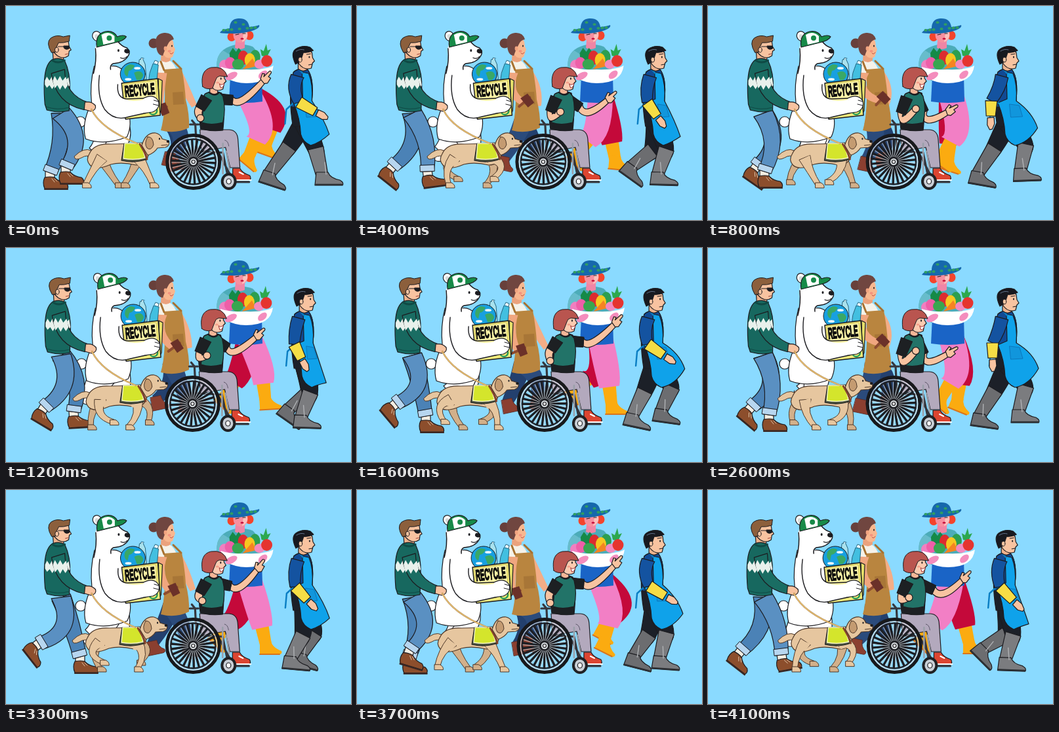
Write an HTML page with a canvas that moves like this. It is 526 px wide and 327 px high and loops after 4200 ms.

```html
<!DOCTYPE html>
<html lang="en">
<head>
<meta charset="utf-8">
<title>Walking parade</title>
<style>
html, body { margin: 0; width: 100%; height: 100%; overflow: hidden; background: #8adaff; }
canvas { display: block; }
</style>
</head>
<body>
<canvas id="stage" width="526" height="327"></canvas>
<script>
const ctx = document.getElementById('stage').getContext('2d');
const INK = '#1c1c20', SKIN = '#f8c3a0';
const STEP = 100, FRAMES = 42, CYCLE = 19;
const KEYS = [0, 3, 7, 8, 11, 14, 16];
ctx.lineJoin = ctx.lineCap = 'round';

function paint(path, fill, line, lw) {
  if (fill) { ctx.fillStyle = fill; ctx.fill(path); }
  if (line) { ctx.strokeStyle = line; ctx.lineWidth = lw; ctx.stroke(path); }
}
const shape = (d, fill, line = INK, lw = 1.2) => paint(new Path2D(d), fill, line, lw);

function oval(x, y, rx, ry, fill, line, lw = 1.2, turn = 0) {
  const p = new Path2D();
  p.ellipse(x, y, rx, ry, turn, 0, 7);
  paint(p, fill, line, lw);
}

function at(x, y, deg, draw) {
  ctx.save();
  ctx.translate(x, y);
  ctx.rotate(deg * Math.PI / 180);
  draw();
  ctx.restore();
}

// Interpolate a pose given at the KEYS of the walk cycle.
function pose(k, rows) {
  let i = KEYS.length - 1;
  while (KEYS[i] > k) i--;
  const j = (i + 1) % KEYS.length;
  const f = (k - KEYS[i]) / ((j ? KEYS[j] : CYCLE) - KEYS[i]);
  return rows[i].map((v, c) => v + (rows[j][c] - v) * f);
}

const mix = (a, b, f) => [a[0] + (b[0] - a[0]) * f, a[1] + (b[1] - a[1]) * f];

// Tapered tube through two or three points.
function limb(pts, widths, fill, line = INK, lw = 1.2) {
  const left = [], right = [];
  pts.forEach(([x, y], i) => {
    const a = pts[i - 1] || pts[i], b = pts[i + 1] || pts[i];
    const dx = b[0] - a[0], dy = b[1] - a[1];
    const h = widths[i] / 2 / (Math.hypot(dx, dy) || 1);
    left.push([x - dy * h, y + dx * h]);
    right.unshift([x + dy * h, y - dx * h]);
  });
  const p = new Path2D();
  const side = (s, start) => {
    p[start](...s[0]);
    if (s.length < 3) return p.lineTo(...s[1]);
    const c = [0, 1].map(n => 1.7 * s[1][n] - 0.35 * (s[0][n] + s[2][n]));
    p.quadraticCurveTo(...c, ...s[2]);
  };
  side(left, 'moveTo');
  side(right, 'lineTo');
  p.closePath();
  paint(p, fill, line, lw);
}

function knee(hip, foot, l1, l2, dir = 1) {
  const dx = foot[0] - hip[0], dy = foot[1] - hip[1];
  const d = Math.min(Math.hypot(dx, dy), l1 + l2 - 0.1);
  const bend = Math.acos((l1 * l1 + d * d - l2 * l2) / (2 * l1 * d));
  const a = Math.atan2(dy, dx) - dir * bend;
  return [hip[0] + l1 * Math.cos(a), hip[1] + l1 * Math.sin(a)];
}

function gardener(k, q) {
  const leg = (rows, fill) => {
    const [x, y, turn] = pose(k, rows), hip = [371, 138], foot = [x, y];
    const kn = knee(hip, foot, 49, 49);
    limb([mix(kn, foot, 0.4), foot], [21, 18], '#fbab10', null);
    at(x, y, turn, () => shape('M-9 -6H8Q9 4 24 10Q26 15 20 15H-9Z', '#fbab10', null));
    at(x, y, turn, () => shape('M-9 15H21', null, '#d9741c', 2));
    limb([hip, kn, mix(kn, foot, 0.5)], [38, 38, 31], fill, null);
  };
  leg([[396, 212, 20], [398, 235, 0], [380, 233, 22], [366, 236, 18], [338, 230, 40], [325, 222, 45], [332, 214, 45]], '#c4093a');
  leg([[371, 228, 40], [330, 225, 45], [356, 228, 40], [358, 229, 35], [395, 230, -5], [396, 236, 0], [388, 239, 0]], '#f27fc5');
  shape('M342 106H390L391 146Q366 150 340 146Z', '#1a64c6', null);
  shape('M336 64Q354 54 376 62Q386 70 388 96L384 114H340L322 98Q318 74 336 64Z', '#4cacb9', null);
  shape('M331 68Q318 78 323 98L338 104L344 76Z', '#67bccb', null);
  oval(333, 91, 8, 9, '#f07fc0');
  shape('M350 52H364V64Q357 68 349 64Z', '#ef86a6', null);
  oval(344, 47, 6.5, 7, '#f4442c');
  oval(371, 45, 6.5, 7, '#f4442c');
  oval(357.5, 44, 11, 12, '#f7909f');
  shape('M363 35Q369 38 368 46Q365 54 360 55Z', '#fbc0bd', null);
  shape('M350 44L355 43M361 42L365 42', null, INK, 1.2);
  oval(360, 50, 2.5, 1.5, '#c8143e');
  shape('M341 34Q341 20 354 19Q369 18 371 32Q381 31 386 29Q388 33 378 37Q362 43 342 42Q332 42 326 41Q328 36 341 34Z', '#1668ac', null);
  for (let i = 0; i < 9; i++)
    oval(332 + i * 6, 37 - 11 * Math.max(0, Math.sin((i - 1) / 5 * Math.PI)) * (i % 2) - i * 0.5, 2.6, 1.9, '#2f9e62');
  at(-2 * q, 0, 0, () => {
    shape('M342 84L341 72L346 64L351 70L355 64L360 70L358 86Z', '#158a47', null);
    shape('M390 76L388 66L393 69L397 58L399 68L404 66L398 78Z', '#2ca84f', null);
    oval(342, 87, 8, 9, '#ee5fa8');
    oval(362, 79, 8, 11, '#dc2c30');
    oval(380, 78, 8, 11, '#2c9f50');
    oval(372, 83, 8, 11, '#f8c620');
    oval(354, 89, 9, 8, '#38a650');
    shape('M361 97L376 80L382 92Z', '#f58421', null);
    oval(387, 89, 8, 7, '#f489be');
    oval(398, 84, 8.5, 9, '#e5342f');
    shape('M328 93Q340 98 367 97Q396 98 408 91Q405 118 367 118Q331 117 328 93Z', '#fff', null);
    oval(344, 107, 10, 5, '#f48dbd', null, 1, -0.5);
    oval(392, 105, 8, 5, '#f48dbd', null, 1, -0.7);
  });
}

function carpenter(k, q) {
  const a = (k - 14) / CYCLE * Math.PI * 2, hip = [253, 178];
  [-1, 1].forEach(s => {
    const foot = [252 + s * 29 * Math.cos(a), 236 - 7 * Math.max(0, s * Math.sin(a))];
    limb([hip, knee(hip, foot, 31, 31), foot], [29, 24, 17], s < 0 ? '#23406e' : '#2b4b7c', null);
    at(...foot, s * 12, () => shape('M-8 -5H8Q8 6 17 11Q18 16 13 16H-9Z', '#8b3f30', '#5a2c26', 0.8));
  });
  limb([[262, 104], [274, 128], [289 - 18 * q, 153]], [15, 14, 9], '#f3ad86', null);
  shape('M231 88Q239 78 252 85Q262 94 262 112L238 116Q228 104 231 88Z', '#f5f2e9', null);
  shape('M241 97L268 95Q273 124 274 143Q280 166 279 186Q258 196 236 190Q245 158 241 97Z', '#b9853f', null);
  shape('M241 98L236 85M267 96L255 84', null, '#a8712f', 3);
  shape('M254 132L270 131L272 150L255 151Z', '#a87637', null);
  const [hx, hy] = pose(k, [[234, 160], [252, 149], [262, 146], [263, 145], [258, 152], [250, 155], [245, 158]]);
  limb([[237, 102], [235, 130], [hx, hy]], [17, 13, 10], '#f0a67f', null);
  at(hx, hy, -12 - 25 * q, () => {
    shape('M-9 1L12 -3', null, '#8d4b30', 4);
    shape('M-1 -9L12 -10L14 7L2 9Z', '#6b3129', null);
  });
  shape('M237 66H251V83Q244 89 236 83Z', '#eba27d', null);
  shape('M237 50Q248 44 255 54L256 62L258 66L254 78Q244 83 239 72Z', '#f8b78f', null);
  oval(225, 57, 7.5, 7.5, '#68403b');
  shape('M229 61Q225 43 241 41Q253 40 256 51Q249 52 246 60Q242 67 239 76Q230 75 229 61Z', '#704640', null);
  oval(243, 65, 2.4, 3.4, '#f2a581');
  oval(253, 61, 0.9, 1.5, INK);
  shape('M250 72Q252 75 255 71', null, '#bf4a42', 1);
  oval(249, 69, 2.5, 1.7, '#f3917e');
}

function bear(k, q) {
  const a = (k - 3) / CYCLE * Math.PI * 2;
  [-1, 1].forEach(s => {
    const foot = [150 + s * 22 * Math.cos(a), 226 - 5 * Math.max(0, -s * Math.sin(a))];
    limb([[154, 178], knee([154, 178], foot, 27, 27), foot], [54, 40, 28], '#fff');
    at(...foot, 0, () => shape('M-13 -3Q-15 12 -6 13H17Q22 5 13 -3', '#fff'));
  });
  at(4 * q, 0, 0, () => {
    oval(113, 177, 8, 8, '#fff', INK);
    shape('M134 92Q127 120 130 148Q114 180 121 203Q150 214 184 200Q193 180 185 160L180 100Q170 90 160 92Z', '#fff');
    at(2 * (1 - q), 0, 0, () => {
      shape('M200 92L201 82L206 80L210 89L212 112H198Z', '#a9e2ee', '#22647f', 1);
      shape('M217 102L222 88L230 90L228 112H216Z', '#42bfe0', '#22647f', 1);
      shape('M203 82L204 79L208 80M223 87L225 83L230 85L229 89', '#eefaff', '#22647f', 1);
      oval(191, 104, 19, 18, '#18a0e0', INK, 1);
      shape('M179 95Q185 86 194 91Q191 98 185 99L183 108Q176 105 179 95ZM193 102Q204 96 207 106Q204 115 197 113Z', '#3aa866', null);
      oval(198, 95, 5, 2, '#e6f6fc'); oval(184, 112, 5, 2, '#e6f6fc');
      shape('M230 111L236 114L234 160L231 166Z', '#e5de6a');
      shape('M174 118L229 111L233 167L180 173Z', '#efe979', INK, 1.5);
      shape('M177 120L226 114L229 161L184 168Z', '#faf3a6', '#d5c65b', 1);
      oval(222, 160, 6, 6, null, '#259b59', 2.3);
      at(202, 130, -6, () => {
        ctx.scale(1, 2.5);
        ctx.font = 'bold 9.6px "Liberation Sans", Arial, sans-serif';
        ctx.textAlign = 'center';
        ctx.textBaseline = 'middle';
        ctx.fillStyle = ctx.strokeStyle = '#0c0c0c';
        ctx.lineWidth = 0.7;
        ctx.fillText('RECYCLE', 0, 0);
        ctx.strokeText('RECYCLE', 0, 0);
      });
    });
    limb([[150, 110], [164, 156], [215, 152]], [32, 32, 20], '#fff', null);
    shape('M142 106Q138 138 150 158Q165 177 188 169L215 163M170 120Q168 141 184 142L211 141', null, INK, 1.4);
    shape('M209 141Q225 133 232 145Q235 157 223 162L209 164', '#fff');
    shape('M225 144L232 146M224 150L232 152', null, INK, 1);
    oval(138, 46, 6.5, 7.5, '#fff', INK, 1.2, -0.4);
    oval(138, 47, 3, 4, '#d8dcda', null, 1, -0.4);
    shape('M135 66Q139 50 152 52L170 54Q176 62 184 64Q190 70 186 76Q180 87 163 88Q158 92 162 99L133 105Q138 86 135 66Z', '#fff', null);
    shape('M133 103Q138 84 136 65M170 54Q176 62 184 64Q190 70 186 76Q180 87 163 88Q158 90 159 97', null, INK, 1.5);
    oval(184, 69, 4.2, 3.4, INK, null, 1, 0.3);
    oval(171, 68, 1.5, 2.1, INK);
    shape('M174 79Q180 82 184 77', null, INK, 1.1);
    shape('M138 63Q135 43 151 39Q164 37 169 47Q179 43 183 47Q180 53 166 56Z', '#178a48');
    shape('M145 44Q156 37 165 46L165 55L148 59Z', '#fff', null);
    oval(157, 49, 4, 4, '#178a48');
  });
}

function walker(k, q) {
  const hip = [84, 164];
  const leg = (rows, fill) => {
    const [x, y, turn] = pose(k, rows), foot = [x, y];
    at(x, y, turn, () => {
      shape('M-7 -3H7V9H-7Z', '#f4eee2');
      shape('M-8 7Q1 5 7 7Q14 14 24 15Q29 19 27 24H-8Q-12 15 -8 7Z', '#8c4e2c');
      shape('M-8 25H27', null, '#3b2722', 2.2);
      shape('M7 9L11 13M3 9L7 14', null, '#e2c9ad', 0.9);
    });
    const kn = knee(hip, foot, 47, 47);
    limb([hip, kn, foot], [30, 25, 20], fill);
    limb([mix(foot, kn, 0.2), foot], [22, 22], '#b7d6ef', INK, 1);
  };
  leg([[67, 255, 0], [50, 246, 38], [66, 243, 40], [74, 245, 35], [98, 248, -5], [113, 255, 0], [105, 257, 0]], '#4b82b6');
  leg([[91, 247, 0], [112, 252, -10], [93, 255, 0], [86, 253, 0], [62, 248, 20], [50, 235, 52], [59, 238, 50]], '#5a90c2');
  at(2.5 * q, 0, 0, () => {
    shape('M71 70H88L87 86H72Z', '#eeb18b');
    shape('M70 82Q80 78 89 83Q98 102 97 128L96 160Q80 164 62 159L59 150Q56 114 61 96Q64 86 70 82Z', '#17685f');
    const zigzag = 'M59 114L62 108L66 114L70 107L74 114L78 107L82 114L86 107L90 114L95 109L97 121L93 127L90 121L86 128L82 121L78 128L74 121L70 127L66 121L62 125L59 120Z';
    shape(zigzag, '#e9f1ec', null);
    limb([[79, 100], [90, 136], [122, 153]], [21, 18, 13], '#1a6d63');
    shape('M71 114L74 107L78 114L82 107L86 114L91 108L94 121L90 127L86 121L82 128L78 121L74 126Z', '#e9f1ec', null);
    shape('M70 83Q79 89 89 83', null, '#0f4a45', 3);
    shape('M61 154Q78 160 96 155', null, '#0f4a45', 1);
    shape('M120 147Q130 145 136 152Q138 159 129 161L119 158Z', SKIN);
    shape('M70 55Q87 49 95 55L96 62L99 67L96 69L95 76Q87 82 78 76L70 68Z', SKIN);
    shape('M69 71Q60 56 68 49Q77 43 87 47L97 45L96 54Q86 57 80 56L77 62L75 70Z', '#8c5f3c', INK, 1);
    oval(77, 67, 2.8, 3.8, SKIN, INK, 1);
    shape('M79 62L88 62M88 61H96V65Q91 68 88 64Z', INK, INK, 1);
    shape('M90 74L94 73', null, '#a7473c', 1.2);
  });
}

function wheelchair(k, q) {
  const cx = 286 - 3 * q;
  at(-3 * q, 0, 0, () => {
    shape('M296 189H341Q353 190 354 204L357 247H342L335 216L298 222Z', '#b3a9bd');
    shape('M334 205Q339 206 340 214', null, '#5c5668', 1);
    shape('M346 248H357Q360 255 372 259Q375 264 371 267H346Z', '#dc4531');
    shape('M345 266H374M356 254L362 257', null, '#fff', 2);
    shape('M284 175L289 181L291 222L331 224L338 258M321 218L348 269H371M294 181H281', null, '#35363c', 3.2);
    shape('M331 210V256M336 222L341 250', null, '#9aa0aa', 2.5);
    oval(340, 268, 10, 11, '#c9cfd6', '#202124', 4);
    oval(340, 268, 3.5, 4, '#fff', INK);
  });
  const [ex, ey, hx, hy] = pose(k, [
    [362, 145, 394, 113], [362, 160, 391, 136], [339, 176, 370, 161], [339, 176, 370, 161],
    [348, 165, 384, 142], [358, 150, 385, 120], [361, 145, 394, 115]]);
  at(-3 * q, 0, 0, () => {
    const shoulder = [322, 142], sleeve = mix(shoulder, [ex, ey], 0.6);
    limb([sleeve, [ex, ey], [hx, hy]], [12, 11, 8], SKIN);
    limb([shoulder, sleeve], [17, 15], '#1d2023');
    at(hx, hy, Math.atan2(hy - ey, hx - ex) * 57.3, () => {
      shape('M-3 -5L5 -9L7 -6L3 -4L15 -4Q18 -2 15 0L8 1L9 5L0 7L-4 4Z', SKIN);
    });
    shape('M304 134Q316 127 329 133Q335 156 331 190Q314 192 297 188Q291 151 304 134Z', '#1d2023');
    shape('M303 135L309 132Q319 140 326 132L331 138Q336 158 331 178Q313 183 299 178Z', '#227368');
    const fist = mix([294, 173], [320, 157], q);
    const elbow = mix([292, 160], [299, 177], q);
    limb([mix([298, 152], [298, 160], q), elbow, fist], [12, 12, 9], SKIN);
    limb([[306, 140], mix([296, 156], [297, 164], q)], [18, 15], '#1d2023');
    oval(...fist, 5.5, 5.5, SKIN, INK);
    shape('M311 121H323V133Q317 137 311 132Z', '#f5b697');
    shape('M313 101Q327 97 333 104L333 110L336 115L333 118L331 127Q319 133 312 121Z', '#fbcab0');
    shape('M300 123Q296 98 313 94Q333 91 338 108L326 107Q321 108 320 113L315 126Q305 128 300 123Z', '#b9554f', INK, 1);
    oval(328, 111, 1, 1.7, INK);
    shape('M326 119Q329 122 333 118Q332 125 328 125Z', '#fff', '#9f2e2d', 1);
    oval(323, 117, 2.5, 1.5, '#f4a08a');
  });
  oval(cx, 238, 40, 40.5, null, '#18191c', 5);
  oval(cx, 238, 36.5, 37, null, '#d6dade', 1.2);
  oval(cx, 238, 34, 34.5, null, '#22242a', 2.6);
  for (let i = 0; i < 26; i++)
    at(cx, 238, i * 360 / 26 + k * 11, () => {
      shape('M5 0L33 2', null, '#1d1f24', 3.4);
      shape('M8 -1L33 -1', null, '#cfd5da', 0.8);
    });
  oval(cx, 238, 6, 6, '#d5dadd', INK, 1.6);
  oval(cx, 238, 2.5, 2.5, '#fff', INK);
}

function dog(k, q) {
  const a = k / CYCLE * Math.PI * 2, x = 3 * Math.sin(a);
  const tan = '#e6c69f', brown = '#4d3728';
  const leg = (hx, reach, s, fill, back) => {
    const hip = [hx + x, 232];
    const foot = [hx + s * reach * Math.cos(a), 273 - 10 * Math.max(0, s * Math.sin(a))];
    limb([hip, knee(hip, foot, 22, 23, back), foot], [18, 10, 8], fill, brown, 1);
    at(...foot, 0, () => shape('M-4 -3H4Q10 0 9 5H-4Z', fill, brown, 1));
    limb([hip, mix(hip, foot, 0.3)], [17, 10], fill, null);
  };
  leg(146, 25, 1, '#d2b08a', -1);
  leg(202, 22, -1, '#d2b08a', 1);
  at(x, 0, 0, () => {
    shape('M130 221Q119 215 104 230Q105 237 115 232Q124 226 132 232Z', tan, brown, 1);
    shape('M127 226Q134 209 161 211L203 210Q219 214 217 228Q213 243 198 243Q176 238 160 242Q137 252 128 243Q121 235 127 226Z', tan, brown, 1.2);
  });
  leg(146, 25, -1, tan, -1);
  leg(202, 22, 1, tan, 1);
  at(x, 0, 0, () => {
    shape('M180 210L207 209L215 234Q196 241 176 236Z', '#4b5340', INK, 1.1);
    shape('M181 210L206 210L212 232Q196 236 179 233Z', '#d4e52c', '#f7f8c9', 1.3);
    shape('M204 211Q213 225 215 234', null, '#85422c', 3);
    shape('M207 213Q213 193 228 194Q236 196 238 203L248 206Q251 213 243 216L231 217Q226 225 216 228Z', tan, brown, 1.2);
    shape('M216 200Q224 199 225 212Q221 222 215 217Q210 210 216 200Z', '#c49b71', brown, 1);
    oval(247, 207, 2.3, 2, INK);
    oval(234, 203, 1.1, 1.4, INK);
    shape('M237 213L246 212', null, brown, 1);
  });
  const leash = `M${130 + 2 * q} 158Q145 188 ${200 + x} 210`;
  shape(leash, null, '#9b7139', 2.4);
  shape(leash, null, '#f0c878', 1.5);
}

function fisher(k, q) {
  const hip = [454 + 3 * q, 178];
  const leg = (rows, boot) => {
    const [x, y, turn] = pose(k, rows), foot = [x, y];
    const kn = knee(hip, foot, 43, 43);
    limb([hip, kn, mix(kn, foot, 0.3)], [30, 25, 19], '#1c2028');
    limb([kn, foot], [24, 18], boot);
    at(x, y, turn, () => {
      shape('M-9 -5H9Q12 4 27 7Q34 11 31 15H-11Z', boot);
      shape('M-10 14H31', null, '#2d3034', 2.6);
      shape('M4 -20L6 -2', null, '#b0b2b5', 1.4);
    });
  };
  leg([[400, 258, 18], [418, 243, 45], [413, 258, 8], [410, 258, 10], [420, 244, 45], [448, 254, 15], [463, 251, 8]], '#6c6d70');
  leg([[482, 259, 0], [453, 261, 2], [473, 252, 0], [476, 253, -2], [457, 261, 0], [433, 259, 5], [419, 258, 12]], '#7b7c7f');
  at(4 * q, 0, 0, () => {
    shape('M438 101Q447 93 460 98Q469 111 466 142L468 184L437 184Q429 137 438 101Z', '#1c2028');
    shape('M438 101Q447 93 460 98Q469 111 466 142L464 156L435 154Q430 124 438 101Z', '#114a94');
    // The hem kicks forward once per step.
    const kick = Math.cos((k - 7) / CYCLE * Math.PI * 4);
    const tip = 493 + 7 * kick, tipY = 195 - 11 * kick;
    shape(`M451 101L461 103Q468 120 466 145Q${tip - 8} ${tipY - 24} ${tip} ${tipY}Q${tip - 14} 209 464 213Q452 208 449 196Q448 172 438 148L452 142Z`, '#0fa2ea');
    shape('M452 103L446 96M438 148L427 158L425 180', null, '#0b7fc4', 2.5);
    shape(`M456 150L${469 + kick * 2} 152L${474 + kick * 2} 169L458 170Z`, '#1196dc', '#0d74b8', 0.9);
    const [ex, ey, hx, hy] = pose(k, [
      [446, 147, 477, 165], [443, 148, 468, 174], [430, 145, 430, 174], [428, 145, 427, 174],
      [436, 147, 445, 176], [440, 148, 463, 173], [443, 147, 473, 168]]);
    limb([[444, 107], [439, 126], [ex, ey]], [20, 19, 16], '#1453a0');
    limb([[ex, ey], mix([ex, ey], [hx, hy], 0.8)], [18, 14], '#f6dd45');
    at(hx, hy, Math.atan2(hy - ey, hx - ex) * 57.3, () =>
      shape('M-4 -5L6 -6L14 -3L15 1L8 5L-3 5Z', SKIN));
    shape('M445 83H459V97Q452 102 445 96Z', '#edb28d');
    shape('M447 69Q460 65 466 71L467 79L470 84L467 87L465 95Q454 99 446 88Z', SKIN);
    shape('M441 89Q433 72 441 66Q451 59 463 63L468 68Q459 72 453 71L450 80L446 86Z', '#17191f');
    shape('M442 69Q448 65 454 67', null, '#62738c', 1);
    oval(448, 82, 2.8, 3.8, SKIN, INK, 1);
    oval(462, 78, 1, 1.5, INK);
    shape('M458 74L464 73M461 90L466 89', null, INK, 1.2);
  });
}

function render(now) {
  const k = Math.floor(now / STEP) % FRAMES % CYCLE;
  const q = (1 + Math.cos((k - 7.5) / CYCLE * Math.PI * 2)) / 2;
  ctx.fillStyle = '#8adaff';
  ctx.fillRect(0, 0, 526, 327);
  [gardener, carpenter, bear, walker, wheelchair, dog, fisher].forEach(draw => draw(k, q));
}

const start = performance.now();
function tick() {
  render(performance.now() - start);
  requestAnimationFrame(tick);
}
tick();
</script>
</body>
</html>
```
